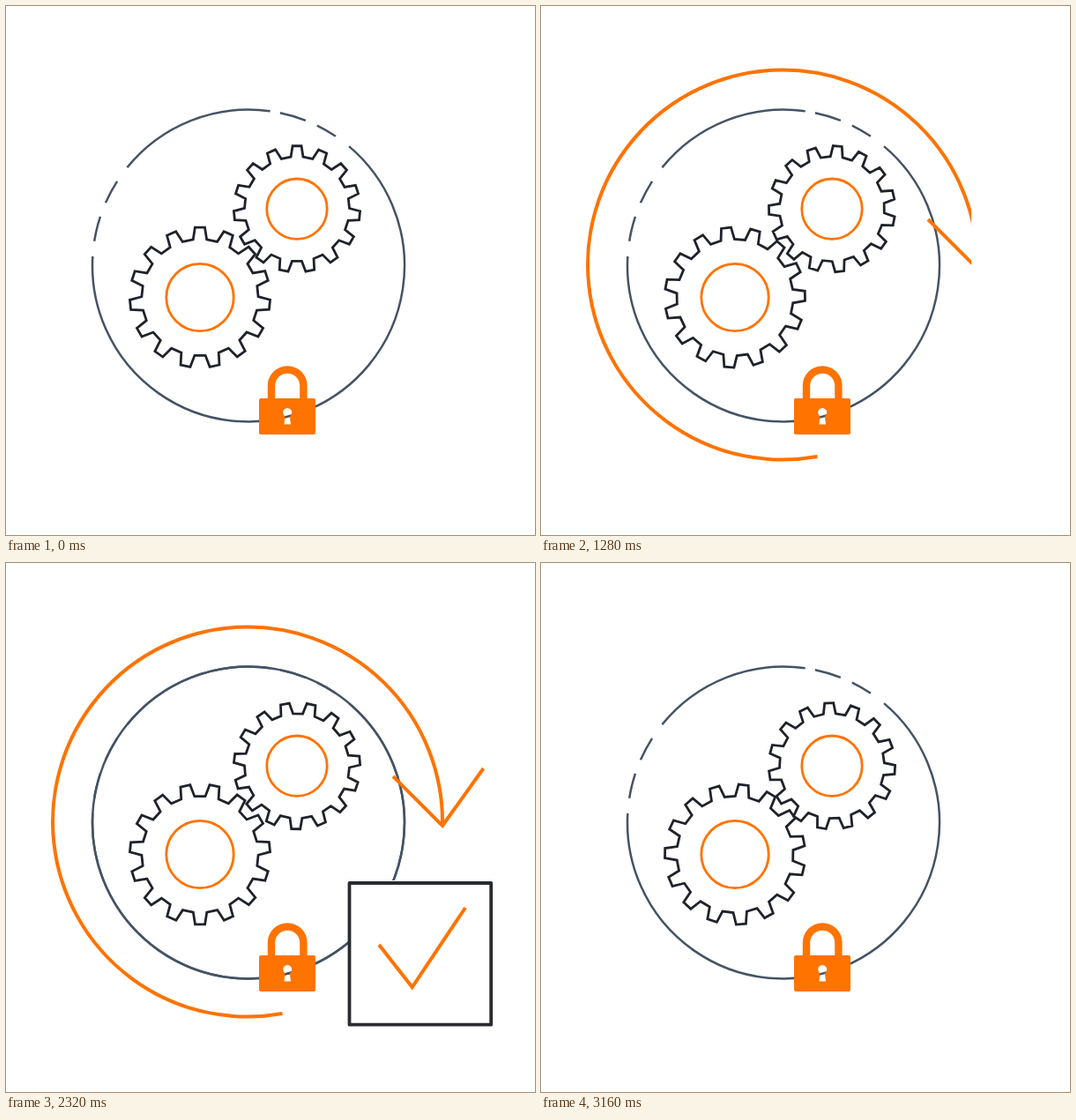
Write an HTML page that moves like this. It is 600 px wide and 600 px high and loops after 3.2 s.

```html
<!DOCTYPE html>
<html lang="en">
<head>
<meta charset="utf-8">
<title>Secure process</title>
<style>
  html, body { margin: 0; width: 100%; height: 100%; overflow: hidden; background: #fff; }
  svg { display: block; width: 100vw; height: 100vh; }
</style>
</head>
<body>
<svg viewBox="0 0 600 600" fill="none">
  <defs>
    <clipPath id="wipe"><rect id="wipeRect" x="0" y="0" width="0" height="600"/></clipPath>
  </defs>
  <g stroke="#455364" stroke-width="2.5">
    <path id="brokenRing"/>
    <circle id="fullRing" cx="275" cy="294.5" r="177"/>
  </g>
  <g stroke="#20222b" stroke-width="2.8">
    <path id="bigGear"/>
    <path id="smallGear"/>
  </g>
  <g stroke="#ff7300" stroke-width="2.8">
    <circle cx="220" cy="330.5" r="38.2"/>
    <circle cx="330" cy="230.2" r="34.2"/>
  </g>
  <g id="arrow" clip-path="url(#wipe)" stroke="#ff7300" stroke-width="4">
    <path d="M313.5 511A221 221 0 1 1 495 297"/>
    <path d="M439 242L495 298L541.5 233"/>
  </g>
  <g id="checkbox">
    <path d="M388 360H552V525H388Z" fill="#fff"/>
    <rect x="389.5" y="363" width="160.7" height="160.7" stroke="#2a2b2f" stroke-width="3.8" stroke-linejoin="round"/>
    <path d="M423 433L460.700 481L521 391" stroke="#ff7300" stroke-width="4"/>
  </g>
  <path d="M301 447V430.700A18.200 18.200 0 0 1 337.400 430.700V447" stroke="#ff7300" stroke-width="8.4"/>
  <path fill="#ff7300" fill-rule="evenodd" d="M289 445H349Q351 445 351 447V484Q351 486 349 486H289Q287 486 287 484V447Q287 445 289 445Z
    M316.500 465.300A5 5 0 1 1 321.900 465.300L323 474.500H315.500Z"/>
</svg>
<script>
const LOOP = 3200;
const TEETH = 15;
const $ = id => document.getElementById(id);
const clamp = v => Math.min(1, Math.max(0, v));
const ramp = (t, from, to) => clamp((t - from) / (to - from));

// Degrees run clockwise from twelve o'clock.
function polar(cx, cy, r, deg) {
  const a = deg * Math.PI / 180;
  return `${(cx + r * Math.sin(a)).toFixed(2)} ${(cy - r * Math.cos(a)).toFixed(2)}`;
}

function gearPath(cx, cy, scale, turn) {
  const profile = [[-6.7, 66.1], [-4, 79.6], [4, 79.6], [6.7, 66.1]];
  const points = [];
  for (let i = 0; i < TEETH; i++) {
    for (const [offset, r] of profile) {
      points.push(polar(cx, cy, r * scale, turn + offset + i * 360 / TEETH));
    }
  }
  return `M${points.join('L')}Z`;
}

function ringPath(segments) {
  return segments.map(([from, to]) =>
    `M${polar(275, 294.5, 177, from)}A177 177 0 ${to - from > 180 ? 1 : 0} 1 ${polar(275, 294.5, 177, to)}`
  ).join('');
}

function track(keys, t) {
  let i = 1;
  while (i < keys.length - 1 && t > keys[i][0]) i++;
  const [t0, v0] = keys[i - 1], [t1, v1] = keys[i];
  return v0 + (v1 - v0) * ramp(t, t0, t1);
}

const bigTurn = [[0, 0], [680, -26.4], [1280, -55.2], [1600, -66], [2040, -90], [2600, -126], [3160, -136.8], [LOOP, -144]];
const smallTurn = [[0, 0], [680, 25.2], [1280, 53], [1600, 64.5], [2040, 98], [2600, 120], [3160, 141.3], [LOOP, 144]];

$('brokenRing').setAttribute('d', ringPath([
  [-51, 8], [11.7, 21.5], [26.1, 34], [40.1, 273.4], [279, 288.3], [293.7, 302.7]
]));

function draw(t) {
  $('bigGear').setAttribute('d', gearPath(220, 330.5, 1, track(bigTurn, t)));
  $('smallGear').setAttribute('d', gearPath(330, 230.2, 0.9, track(smallTurn, t)));

  const leaving = 1 - ramp(t, 2720, 3080);
  $('wipeRect').setAttribute('width', 51 + 501 * ramp(t, 774, 1355));
  $('arrow').setAttribute('opacity', leaving);
  $('checkbox').setAttribute('opacity', ramp(t, 1340, 1580) * leaving);
  $('fullRing').setAttribute('opacity', ramp(t, 1720, 2100) * leaving);
}

const start = performance.now();
function tick() {
  draw((performance.now() - start) % LOOP);
  requestAnimationFrame(tick);
}
tick();
</script>
</body>
</html>
```
